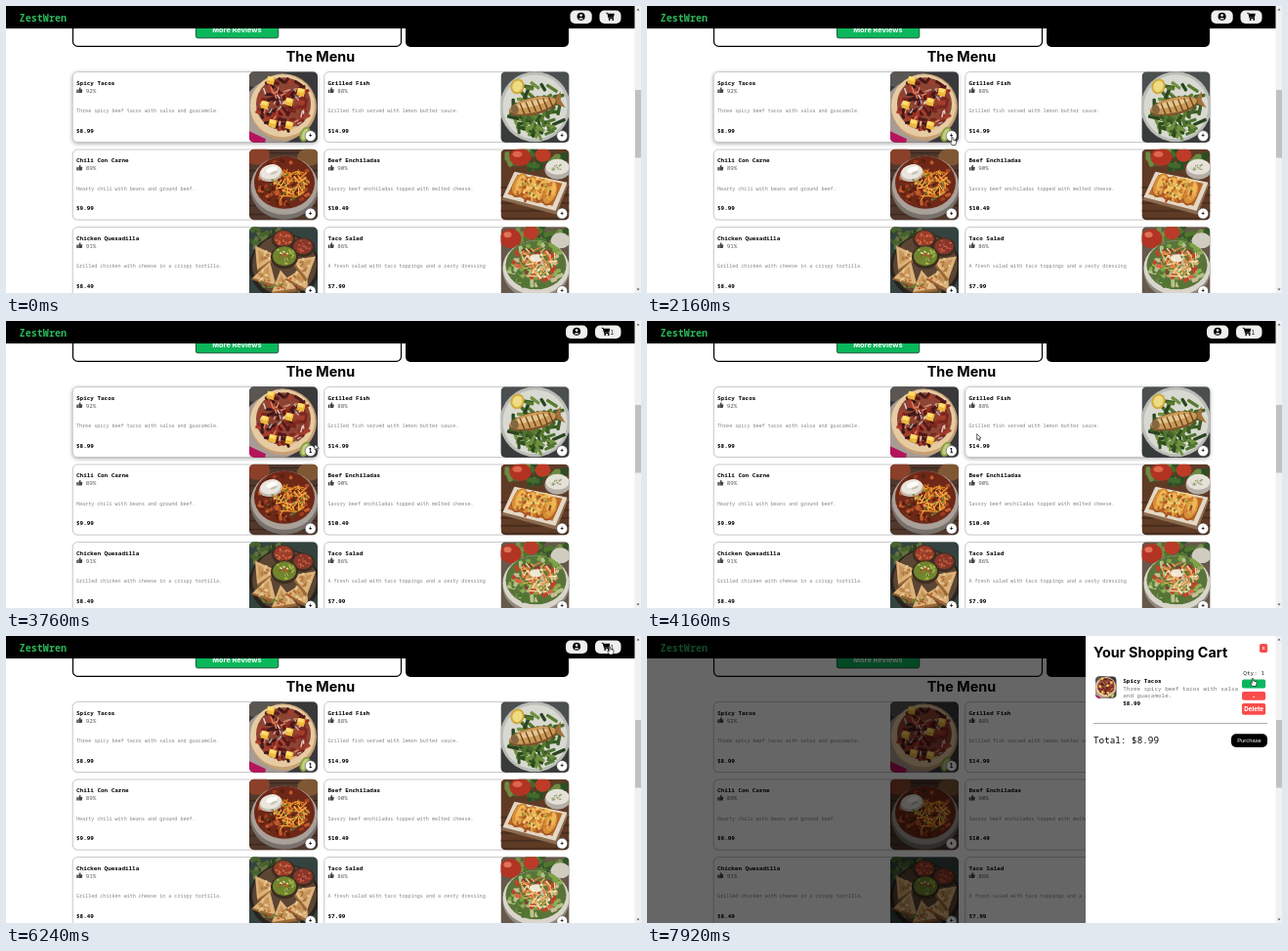
Write an HTML page with a canvas that moves like this. It is 650x294 px and loops after 8000 ms.

```html
<!DOCTYPE html>
<html lang="en">
<head>
<meta charset="utf-8">
<title>Food ordering demo</title>
<style>
html, body { margin: 0; width: 100%; height: 100%; overflow: hidden; background: #fff; }
canvas { display: block; width: 100vw; height: 100vh; }
</style>
</head>
<body>
<canvas id="stage" width="650" height="294"></canvas>
<script>
const W = 650, H = 294, LOOP = 8000, STEP = 80;
const POINTER_AT = 880, ADD_AT = 2400, CART_AT = 6400;
const MONO = '"Noto Sans Mono", "DejaVu Sans Mono", monospace';
const SANS = 'Inter, "Open Sans", sans-serif';
const ARIAL = '"Liberation Sans", sans-serif';
const GREEN = '#0bb75b', RED = '#fa4b4b';

const view = document.getElementById('stage').getContext('2d');
let g = view;
let seed = 1;

function rand() {
  seed = (seed * 16807) % 2147483647;
  return seed / 2147483647;
}

function rect(x, y, w, h, color) {
  g.fillStyle = color;
  g.fillRect(x, y, w, h);
}

function round(x, y, w, h, r, fill, stroke, line = 1) {
  g.beginPath();
  g.roundRect(x, y, w, h, r);
  if (fill) { g.fillStyle = fill; g.fill(); }
  if (stroke) { g.strokeStyle = stroke; g.lineWidth = line; g.stroke(); }
}

function oval(x, y, rx, ry, color, turn = 0) {
  g.beginPath();
  g.ellipse(x, y, rx, ry, turn, 0, 7);
  g.fillStyle = color;
  g.fill();
}

function poly(points, fill, stroke, line = 1) {
  g.beginPath();
  for (let i = 0; i < points.length; i += 2) g.lineTo(points[i], points[i + 1]);
  g.closePath();
  if (fill) { g.fillStyle = fill; g.fill(); }
  if (stroke) { g.strokeStyle = stroke; g.lineWidth = line; g.stroke(); }
}

// Large font drawn scaled down keeps fractional glyph spacing.
function text(s, x, y, size, color, family = MONO, weight = 400, align = 'left') {
  g.save();
  g.translate(x, y);
  g.scale(0.1, 0.1);
  g.font = `${weight} ${size * 10}px ${family}`;
  g.textAlign = align;
  g.fillStyle = color;
  g.fillText(s, 0, 0);
  g.restore();
}

function scatter(n, cx, cy, rx, ry, w, h, colors) {
  for (let i = 0; i < n; i++) {
    const a = rand() * 6.283, d = Math.sqrt(rand());
    g.save();
    g.translate(cx + Math.cos(a) * d * rx, cy + Math.sin(a) * d * ry);
    g.rotate(rand() * 3.14);
    const k = 0.6 + rand() * 0.7;
    round(-w * k / 2, -h / 2, w * k, h, Math.min(w * k, h) / 3, colors[i % colors.length]);
    g.restore();
  }
}

function tacos() {
  rect(0, 0, 70, 73, '#39383b');
  oval(12, 4, 24, 12, '#5a5654');
  oval(27, 41, 34, 33, '#a79b94');
  oval(35, 36, 34, 34, '#c79f72');
  oval(34, 35, 33, 32, '#e6cba2');
  oval(35, 33, 28, 27, '#8c4433');
  scatter(85, 35, 33, 27, 26, 9, 3, ['#7c2520', '#541a18', '#a83d2c', '#3b1919', '#91291f']);
  scatter(32, 35, 35, 27, 26, 6, 1.5, ['#dccac0', '#b3a5a1', '#d98062']);
  for (const [x, y] of [[22, 9], [41, 31], [16, 34], [41, 55], [53, 21], [24, 53]]) {
    g.save();
    g.translate(x, y);
    g.rotate(0.25);
    rect(-3.8, -3.8, 7.6, 7.6, '#efb93a');
    rect(-3.8, -3.8, 6, 4, '#ffdc70');
    g.restore();
  }
  poly([0, 61, 17, 69, 16, 73, 0, 73], '#b5145d');
  oval(57, 64, 5, 8, '#8aa044', 0.4);
  oval(57, 64, 3, 6, '#c4ce83', 0.4);
}

function fish() {
  rect(0, 0, 70, 73, '#4b4f50');
  rect(0, 48, 70, 25, '#383b3b');
  oval(35, 36, 36, 36, '#b9bbb5');
  oval(35, 36, 33, 33, '#d8d9d1');
  scatter(62, 37, 38, 27, 26, 12, 3.4, ['#3b5c24', '#587a2f', '#2a4520', '#70913e', '#45652a']);
  oval(17, 15, 7, 8, '#cfab39', 0.4);
  oval(17, 15, 5, 6, '#eedb83', 0.4);
  g.save();
  g.translate(35, 35);
  g.rotate(-0.22);
  poly([19, 0, 29, -9, 27, 0, 30, 9], '#a4713c');
  oval(-2, 0, 25, 9, '#7f552c');
  oval(-2, -1, 24, 7.5, '#cb9a56');
  oval(-4, -3, 18, 3, '#e6c58b');
  for (let x = -15; x < 18; x += 6) poly([x, -6, x + 1.2, -6, x + 3.5, 6, x + 2, 6], '#654224');
  oval(-21, -1, 4, 5, '#866640');
  g.restore();
  scatter(22, 36, 56, 22, 9, 11, 3, ['#6e9040', '#31511f', '#4f7330']);
}

function chili() {
  rect(0, 0, 70, 73, '#51382c');
  for (let y = 3; y < 73; y += 9) rect(0, y, 70, 1.5, '#3b281f');
  oval(8, 6, 13, 10, '#8a4029');
  oval(61, 8, 12, 9, '#7f5734');
  oval(36, 40, 35, 32, '#77706b');
  oval(36, 37, 34, 30, '#a9a099');
  oval(36, 34, 31, 27, '#6e2818');
  scatter(85, 36, 34, 28, 24, 5, 3.4, ['#9e3e20', '#722616', '#c45b2b', '#56200f', '#a84c29']);
  scatter(65, 42, 34, 19, 16, 8, 1.3, ['#ee9c30', '#f6b447', '#d77920']);
  oval(22, 25, 12, 8, '#c3b9af', -0.2);
  oval(22, 23, 11, 7.5, '#e9e4dc', -0.2);
  oval(23, 21, 6, 3, '#fffdf7', -0.3);
  oval(25, 24, 4, 1.2, '#c9c1b8', -0.4);
  scatter(16, 39, 40, 23, 14, 3, 1.7, ['#7b9143', '#4d702d']);
}

function enchiladas() {
  rect(0, 0, 70, 73, '#5f3b26');
  for (let y = 38; y < 73; y += 8) rect(0, y, 70, 2, '#492d1e');
  scatter(26, 37, 9, 34, 10, 10, 5, ['#416a2d', '#6c8a42', '#2d4d25']);
  oval(20, 8, 11, 9, '#b23322');
  oval(17, 5, 5, 3, '#dd674d');
  oval(43, 6, 8, 7, '#bd3b27');
  oval(58, 21, 13, 10, '#b4afa6');
  oval(58, 18, 12, 8, '#e5e1d8');
  scatter(14, 58, 18, 8, 4, 3, 1.5, ['#91a16f', '#d7d1c1']);
  poly([13, 24, 69, 36, 57, 67, 1, 52], '#8c6c50');
  poly([14, 23, 68, 34, 56, 63, 2, 49], '#e4d8c6');
  poly([17, 26, 63, 35, 53, 58, 7, 46], '#bb6828');
  for (let i = 0; i < 4; i++) {
    const x = 19 + i * 10.5, y = 37 + i * 2.8;
    oval(x, y, 7, 13, '#a35725', 0.4);
    oval(x, y - 1, 6.5, 12, '#d88e36', 0.4);
    oval(x + 1, y - 2, 4, 9, '#efb857', 0.4);
  }
  scatter(65, 35, 41, 22, 12, 5, 2.5, ['#c77b30', '#f7cb75', '#e4a546', '#a95325', '#ecb458']);
  scatter(9, 36, 41, 19, 9, 3, 1.6, ['#788a37', '#53702e']);
}

function quesadilla() {
  rect(0, 0, 70, 73, '#34433f');
  scatter(22, 11, 7, 22, 12, 11, 4, ['#47632d', '#2d4322', '#65713d']);
  oval(36, 41, 36, 34, '#29231f');
  oval(36, 39, 33, 31, '#5b4533');
  const dip = (x, y, r, dark, light) => {
    oval(x, y, r + 2, r, '#3c2d21');
    oval(x, y - 1, r, r - 2, dark);
    scatter(24, x, y - 1, r - 2, r - 3, 3, 1.8, [light, dark]);
  };
  dip(35, 13, 10, '#9a3d28', '#cd6c48');
  dip(55, 21, 10, '#87372a', '#c25b42');
  const wedge = (x, y, turn) => {
    g.save();
    g.translate(x, y);
    g.rotate(turn);
    poly([-13, 9, 0, -14, 14, 10], '#9a6735');
    poly([-12, 7, 0, -14, 13, 7], '#dbb27a');
    poly([-7, 3, 0, -9, 6, 4], '#c5935a');
    scatter(12, 0, 1, 8, 6, 4, 1.6, ['#ebcb95', '#ad743b', '#d09d5c']);
    g.restore();
  };
  wedge(14, 31, -0.6);
  wedge(17, 49, 0.3);
  wedge(34, 58, -0.15);
  wedge(52, 52, 0.5);
  wedge(57, 39, 0.9);
  dip(36, 31, 12, '#71852d', '#a8b84d');
  scatter(12, 37, 30, 7, 5, 3, 1.6, ['#c34c2c', '#e8dcac', '#4d6827']);
  scatter(18, 35, 61, 28, 9, 4, 1.6, ['#6d8135', '#b6542d']);
}

function salad() {
  rect(0, 0, 70, 73, '#66584a');
  scatter(26, 43, 7, 28, 9, 11, 5, ['#51762e', '#769344', '#365729']);
  oval(10, 12, 11, 10, '#b23424');
  oval(7, 8, 4, 3, '#df7357');
  oval(31, 6, 8, 7, '#ba3b29');
  oval(61, 14, 10, 8, '#d1ccc0');
  oval(36, 45, 34, 29, '#8f8a81');
  oval(36, 42, 34, 28, '#d9d5cb');
  oval(36, 39, 31, 25, '#59743a');
  scatter(65, 36, 38, 29, 23, 7, 4, ['#7ea344', '#b6c28a', '#507630', '#91ac55', '#c8bd94']);
  scatter(28, 35, 38, 26, 19, 6, 4, ['#bd4429', '#d96542', '#83422c']);
  scatter(60, 38, 37, 20, 15, 8, 1.3, ['#efaa58', '#f6d9a3', '#dd8147']);
  oval(36, 32, 7, 4, '#eee6d1');
  scatter(18, 36, 39, 21, 13, 3, 1.6, ['#54782f', '#fff0ca']);
}

const dishes = [
  ['Spicy Tacos', '92%', 'Three spicy beef tacos with salsa and guacamole.', '$8.99', tacos],
  ['Grilled Fish', '88%', 'Grilled fish served with lemon butter sauce.', '$14.99', fish],
  ['Chili Con Carne', '89%', 'Hearty chili with beans and ground beef.', '$9.99', chili],
  ['Beef Enchiladas', '90%', 'Savory beef enchiladas topped with melted cheese.', '$10.49', enchiladas],
  ['Chicken Quesadilla', '91%', 'Grilled chicken with cheese in a crispy tortilla.', '$8.49', quesadilla],
  ['Taco Salad', '86%', 'A fresh salad with taco toppings and a zesty dressing', '$7.99', salad]
].map(([name, liked, about, price, paint], i) => ({
  name, liked, about, price, paint,
  x: i % 2 ? 325.5 : 68, y: 67.3 + Math.floor(i / 2) * 79.5
}));

function photo(paint, x, y, scale, radius) {
  g.save();
  g.translate(x, y);
  g.scale(scale, scale);
  g.beginPath();
  g.roundRect(0, 0, 70, 72.4, radius);
  g.clip();
  seed = 4321;
  paint();
  g.restore();
}

function thumb(x, y) {
  rect(x, y + 2.3, 1.5, 3.4, '#444');
  poly([x + 2, y + 2.5, x + 3.3, y, x + 4.3, y + 0.4, x + 3.9, y + 2,
    x + 6, y + 2.1, x + 5.4, y + 5.6, x + 2, y + 5.6], '#444');
}

function card(d, hover, count) {
  const { x, y } = d;
  g.save();
  g.shadowColor = hover ? 'rgba(0,0,0,.35)' : 'rgba(0,0,0,.12)';
  g.shadowBlur = hover ? 4 : 1.5;
  g.shadowOffsetY = hover ? 1.2 : 0.4;
  round(x, y, 250.6, 72.4, 5, '#fff');
  g.restore();
  round(x + 0.3, y + 0.2, 250, 72, 5, null, '#999', 0.5);
  text(d.name, x + 4, y + 13.6, 5.95, '#000', MONO, 700);
  thumb(x + 4.3, y + 16);
  text(d.liked, x + 13.7, y + 21.4, 5.9, '#555');
  text(d.about, x + 4, y + 42, 5.07, '#858585');
  text(d.price, x + 4, y + 62.6, 5.95, '#000', MONO, 700);
  photo(d.paint, x + 181, y, 1, 5);
  round(x + 238.2, y + 60.3, 11, 11, 5.5, '#fff', '#333', 0.5);
  text(count || '+', x + 243.7, y + 68, 6.2, '#000', MONO, 800, 'center');
}

function userIcon(x, y) {
  oval(x, y, 4, 4, '#000');
  oval(x, y - 1.2, 1.3, 1.3, '#eee');
  g.beginPath();
  g.ellipse(x, y + 2.8, 2.5, 1.7, 0, Math.PI, 0);
  g.fillStyle = '#eee';
  g.fill();
}

function cartIcon(x, y) {
  g.beginPath();
  g.moveTo(x - 4.2, y - 3.5);
  g.lineTo(x - 2.7, y - 3.5);
  g.lineTo(x - 1.4, y + 1.8);
  g.lineTo(x + 3.5, y + 1.8);
  g.strokeStyle = '#000';
  g.lineWidth = 1;
  g.stroke();
  poly([x - 2.5, y - 3, x + 4.3, y - 3, x + 3.4, y + 0.9, x - 1.6, y + 0.9], '#000');
  oval(x - 0.8, y + 3.2, 0.9, 0.9, '#000');
  oval(x + 2.8, y + 3.2, 0.9, 0.9, '#000');
}

function page(hovered, added) {
  rect(0, 0, W, H, '#fff');
  round(68.5, -20, 336, 61.4, 5, '#fff', '#000', 1.2);
  round(409, -20, 167, 62, 5, '#000');
  round(194.4, 12, 84.4, 20.8, 2, GREEN, '#16452b', 0.9);
  text('More Reviews', 236.4, 27, 7.35, '#fff', SANS, 700, 'center');
  text('The Menu', 322, 57, 14.4, '#000', SANS, 700, 'center');
  dishes.forEach((d, i) => card(d, i === hovered, i === 0 && added ? '1' : ''));

  rect(0, 0, 644, 23, '#000');
  text('ZestWren', 13.6, 15.8, 10.1, '#2cb85c', MONO, 600);
  const ux = added ? 573 : 577.5, cx = added ? 603 : 607.5;
  round(ux, 4.6, 22.2, 13.4, 5, '#efefef');
  round(cx, 4.6, 629.5 - cx, 13.4, 5, '#efefef');
  userIcon(ux + 11.1, 10.8);
  cartIcon(added ? 614 : 618.5, 10.8);
  if (added) text('1', 620.4, 14, 7, '#333', ARIAL, 400, 'center');
}

function scrollbar() {
  rect(643.5, 0, 6.5, H, '#f1f1f1');
  rect(644, 86, 6, 69.5, '#c1c1c1');
  poly([645.5, 4.5, 647, 2.5, 648.5, 4.5], '#555');
  poly([645.5, 289.5, 647, 291.5, 648.5, 289.5], '#555');
}

function panel() {
  rect(0, 0, 644, H, 'rgba(0,0,0,.6)');
  rect(449, 0, 195, H, '#fff');
  text('Your Shopping Cart', 457, 21.7, 14.4, '#000', SANS, 700);
  round(627, 8, 8.2, 9, 2, RED);
  text('x', 631.1, 14.1, 5, '#fff', ARIAL, 700, 'center');
  photo(tacos, 459, 41.3, 0.31, 14);
  text('Spicy Tacos', 487.3, 47.7, 5.95, '#000', MONO, 700);
  text('Three spicy beef tacos with salsa', 487.3, 55.7, 5.95, '#777');
  text('and guacamole.', 487.3, 63.4, 5.95, '#777');
  text('$8.99', 487.3, 71.2, 5.95, '#000', MONO, 700);
  text('Qty: 1', 610.3, 39.6, 6.1, '#222', MONO, 500);
  const button = (y, h, color, label) => {
    round(609, y, 24.2, h, 2, color);
    text(label, 621.1, y + h / 2 + 2.2, 6.2, '#fff', SANS, 800, 'center');
  };
  button(44.5, 9, GREEN, '+');
  button(57, 8.8, RED, '-');
  button(69, 11.8, RED, 'Delete');
  rect(457, 89.2, 178, 0.9, '#999');
  text('Total: $8.99', 457, 110, 9.3, '#000', MONO, 500);
  round(598, 100.3, 37, 13.7, 5, '#000');
  text('Purchase', 616.5, 109.2, 5.8, '#fff', ARIAL, 400, 'center');
}

// Pointer tip: time, x, y
const path = [
  [0, 308, 128], [880, 308, 128], [1680, 312, 134], [1920, 312.5, 134.5],
  [3040, 312.5, 134.5], [3760, 316, 126], [4000, 317, 124], [4960, 596, 11],
  [5120, 597, 12], [5280, 598, 12], [5760, 618.5, 11], [6240, 618, 11],
  [7040, 618, 11], [7680, 620, 43.5], [8000, 620, 43.5]
];

function pointerAt(t) {
  const i = Math.max(1, path.findIndex(p => p[0] > t));
  const [t0, x0, y0] = path[i - 1], [t1, x1, y1] = path[i];
  const u = (t - t0) / (t1 - t0), k = u * u * (3 - 2 * u);
  return [x0 + (x1 - x0) * k, y0 + (y1 - y0) * k];
}

function arrow(x, y) {
  poly([x, y, x, y + 6, x + 1.4, y + 4.8, x + 2.4, y + 7,
    x + 3.4, y + 6.5, x + 2.4, y + 4.4, x + 4.3, y + 4.2], '#fff', '#000', 0.6);
}

function hand(x, y) {
  poly([x - 0.7, y, x + 0.6, y, x + 0.7, y + 2.6, x + 3.8, y + 3.3, x + 4.2, y + 5,
    x + 3.2, y + 8, x - 0.3, y + 8, x - 2.3, y + 5, x - 1.7, y + 4.2, x - 0.7, y + 5],
  '#fff', '#000', 0.6);
}

const inside = (x, y, l, t, w, h) => x >= l && x <= l + w && y >= t && y <= t + h;

function pointer(x, y, open) {
  const clickable = open
    ? inside(x, y, 609, 43, 24, 10)
    : inside(x, y, 603, 4, 27, 14) || Math.hypot(x - 311.7, y - 133.1) < 5.5;
  (clickable ? hand : arrow)(x, y);
}

const layers = {};
function layer(hovered, added, open) {
  const key = [hovered, added, open].join();
  if (!layers[key]) {
    const c = document.createElement('canvas');
    c.width = W;
    c.height = H;
    g = c.getContext('2d');
    page(hovered, added);
    if (open) panel();
    scrollbar();
    g = view;
    layers[key] = c;
  }
  return layers[key];
}

function draw(now) {
  const t = Math.floor((now % LOOP) / STEP) * STEP;
  const [x, y] = pointerAt(t);
  const open = t >= CART_AT;
  const hovered = open ? -1 : dishes.findIndex(d => inside(x, y, d.x, d.y, 251, 72.4));
  view.drawImage(layer(hovered, t >= ADD_AT, open), 0, 0);
  if (t >= POINTER_AT) pointer(x, y, open);
}

let start;
function tick(now) {
  start ??= now;
  draw(now - start);
  requestAnimationFrame(tick);
}
requestAnimationFrame(tick);
</script>
</body>
</html>
```
